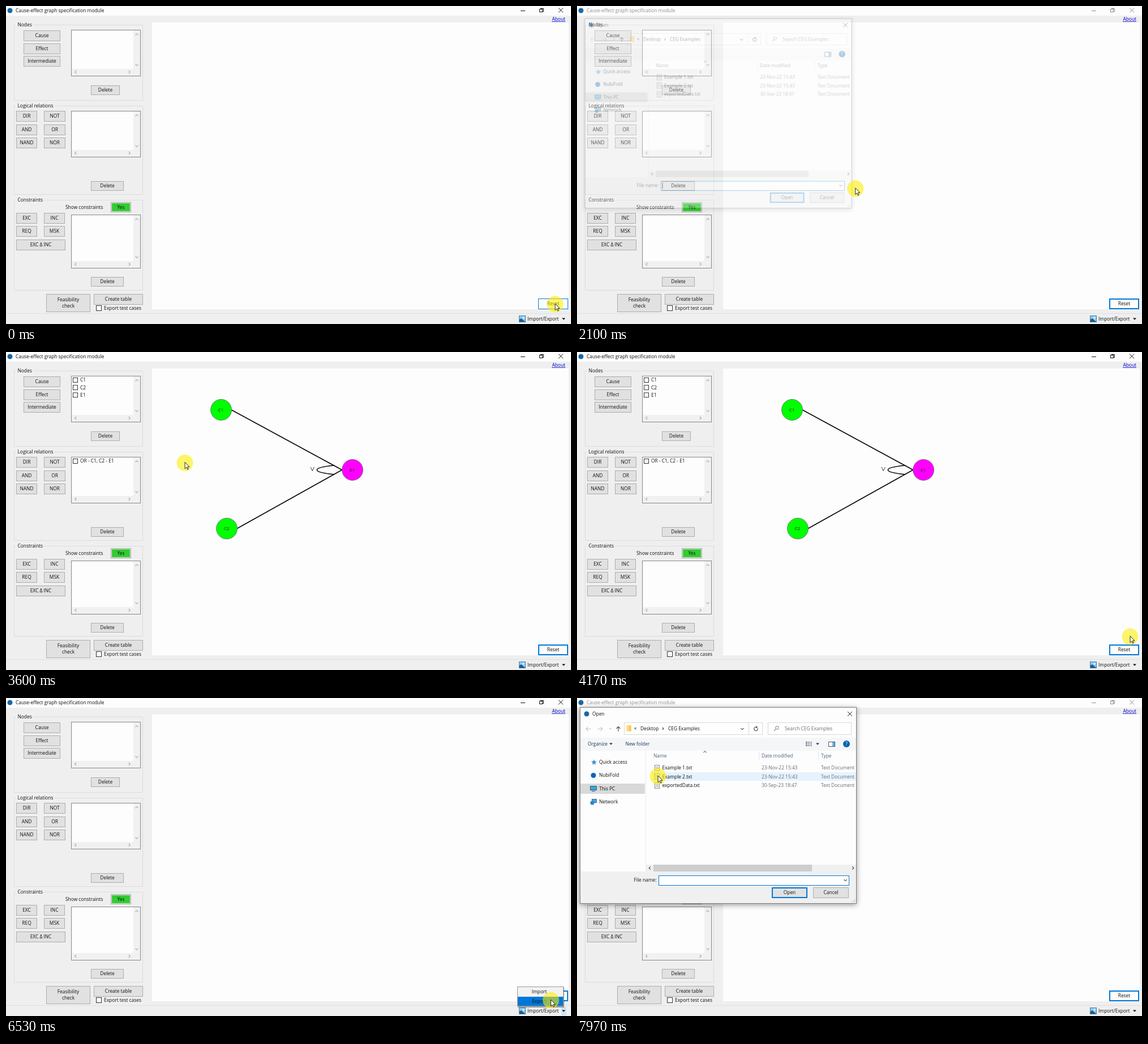
Write an HTML page with a canvas that moves like this. It is 998 px wide and 561 px high and loops after 8 s.

```html
<!DOCTYPE html>
<html lang="en">
<head>
<meta charset="utf-8">
<title>Cause-effect graph specification module</title>
<style>
html, body { margin: 0; height: 100%; overflow: hidden; background: #f0f0f0; }
canvas { display: block; width: 100vw; height: 100vh; }
</style>
</head>
<body>
<canvas id="stage" width="998" height="561"></canvas>
<script>
const LOOP = 8000, W = 998, H = 561;
const BLUE = '#0078d7', FADE_IN = 200, FADE_OUT = 160;
const screen = document.getElementById('stage').getContext('2d');
const layer = document.createElement('canvas');
layer.width = W;
layer.height = H;
const dialogCtx = layer.getContext('2d');
let c = screen;

// Pointer stops: time, x, y
const PATH = [
  [0, 970, 526], [200, 970, 526], [750, 985, 552], [930, 985, 552],
  [1300, 951, 527], [1530, 943, 517], [1670, 943, 517],
  [2450, 163, 180], [2870, 154, 171], [3120, 160, 123], [3380, 160, 123],
  [4170, 977, 502], [4480, 978, 527], [5560, 978, 527],
  [5930, 985, 552], [6180, 985, 552], [6850, 943, 517], [7000, 943, 517],
  [7400, 229, 215], [7900, 143, 138], [LOOP, 143, 138]
];
const MENUS = [[940, 1670], [6150, 7000]];
const DIALOGS = [[2040, 3360], [7320, 9000]];
const GRAPH = [3480, 4700];

const clamp = v => Math.max(0, Math.min(1, v));
const within = (t, [a, b]) => t >= a && t < b;
const inBox = (p, x, y, w, h) => p.x >= x && p.x < x + w && p.y >= y && p.y < y + h;

function pointerAt(t) {
  const i = PATH.findIndex(k => k[0] > t);
  const [t0, x0, y0] = PATH[i - 1], [t1, x1, y1] = PATH[i];
  const u = (t - t0) / (t1 - t0), e = u * u * (3 - 2 * u);
  return { x: x0 + (x1 - x0) * e, y: y0 + (y1 - y0) * e };
}

function rect(x, y, w, h, fill, stroke, lw = 1) {
  if (fill) { c.fillStyle = fill; c.fillRect(x, y, w, h); }
  if (stroke) {
    c.strokeStyle = stroke;
    c.lineWidth = lw;
    c.strokeRect(x + lw / 2, y + lw / 2, w - lw, h - lw);
  }
}

// y is the middle of the capital letters
function text(s, x, y, color = '#111', align = 'left', size = 8.4) {
  c.font = size + 'px "Open Sans", "Noto Sans", sans-serif';
  c.textAlign = align;
  c.fillStyle = color;
  c.fillText(s, x, y + size * 0.357);
}

function line(points, color = '#111', lw = 1) {
  c.beginPath();
  for (let i = 0; i < points.length; i += 2) c.lineTo(points[i], points[i + 1]);
  c.strokeStyle = color;
  c.lineWidth = lw;
  c.stroke();
}

function poly(points, fill) {
  c.beginPath();
  for (let i = 0; i < points.length; i += 2) c.lineTo(points[i], points[i + 1]);
  c.fillStyle = fill;
  c.fill();
}

function disc(x, y, r, fill, stroke) {
  c.beginPath();
  c.arc(x, y, r, 0, 7);
  c.fillStyle = fill;
  c.fill();
  if (stroke) { c.strokeStyle = stroke; c.lineWidth = 0.8; c.stroke(); }
}

// dir: 0 up, 1 right, 2 down, 3 left
function chevron(x, y, dir, color = '#a8a8a8', r = 2.6) {
  c.save();
  c.translate(x, y);
  c.rotate(dir * Math.PI / 2);
  line([-r, r / 2, 0, -r / 2, r, r / 2], color, 1.1);
  c.restore();
}

const caret = (x, y, color = '#111') => poly([x - 3, y - 1.5, x + 3, y - 1.5, x, y + 1.7], color);

function button(label, x, y, w, h = 19, edge = '#adadad', lw = 1, fill = '#e1e1e1') {
  rect(x, y, w, h, fill, edge, lw);
  const rows = label.split('\n');
  rows.forEach((s, i) => text(s, x + w / 2, y + h / 2 + (i - (rows.length - 1) / 2) * 11, '#111', 'center'));
}

function group(title, y, h, gap) {
  line([17, y + .5, 14.5, y + .5, 14.5, y + h + .5, 241.5, y + h + .5, 241.5, y + .5, 20 + gap, y + .5], '#dcdcdc');
  text(title, 20.5, y);
}

function listBox(y, h, items) {
  rect(115, y, 123, h, '#fdfdfd');
  rect(225, y, 12, h, '#f1f1f1');
  rect(116, y + h - 13, 121, 12, '#f1f1f1');
  rect(115, y, 123, h, null, '#828790');
  chevron(231, y + 8, 0);
  chevron(231, y + h - 20, 2);
  chevron(123, y + h - 7.5, 3);
  chevron(218, y + h - 7.5, 1);
  items.forEach((s, i) => {
    rect(118, y + 3 + i * 13.2, 9, 9, '#fff', '#333');
    text(s, 131, y + 7.5 + i * 13.2);
  });
}

function windowTitle(active) {
  const color = active ? '#111' : '#8f8f8f';
  rect(0, 0, W, 17, '#fdfdfd');
  disc(7, 8, 4.5, '#1769a8');
  text('Cause-effect graph specification module', 17, 8.5, color);
  line([909, 8.5, 917, 8.5], color);
  rect(942, 5, 6, 6, null, color);
  line([944, 4.5, 949.5, 4.5, 949.5, 9.5, 948, 9.5], color);
  cross(980, 7.5, color);
}

function cross(x, y, color) {
  line([x - 4, y - 4, x + 4, y + 4], color);
  line([x + 4, y - 4, x - 4, y + 4], color);
}

function panel(loaded) {
  group('Nodes', 33, 133, 27);
  button('Cause', 31, 43, 65);
  button('Effect', 31, 66, 65);
  button('Intermediate', 31, 88, 65);
  listBox(42, 82, loaded ? ['C1', 'C2', 'E1'] : []);
  button('Delete', 150, 140, 51, 17);

  group('Logical relations', 176, 156, 66);
  [['DIR', 'NOT'], ['AND', 'OR'], ['NAND', 'NOR']].forEach(([a, b], i) => {
    const y = Math.round(185 + i * 23.5);
    button(a, 18, y, 37);
    button(b, 67, y, 38);
  });
  listBox(185, 82, loaded ? ['OR - C1, C2 - E1'] : []);
  button('Delete', 150, 309, 58, 17);

  group('Constraints', 342, 159, 46);
  text('Show constraints', 105, 355);
  button('Yes', 185, 346, 36, 18);
  rect(187, 348, 32, 14, '#32cd32');
  text('Yes', 203, 355, '#111', 'center');
  [['EXC', 'INC'], ['REQ', 'MSK']].forEach(([a, b], i) => {
    button(a, 18, 365 + i * 23, 37);
    button(b, 67, 365 + i * 23, 37);
  });
  button('EXC Δ INC', 18, 412, 87);
  listBox(368, 95, []);
  button('Delete', 150, 478, 58, 17);

  button('Feasibility\ncheck', 71, 508, 78, 32);
  button('Create table', 155, 508, 87);
  rect(159, 528, 10, 10, '#fff', '#333');
  text('Export test cases', 173, 533);
}

function graph() {
  line([398, 102, 593.5, 208], '#000', 1.5);
  line([408, 311.5, 593.5, 208], '#000', 1.5);
  c.beginPath();
  c.moveTo(580, 200);
  c.bezierCurveTo(539, 204, 539, 212, 580, 216);
  c.stroke();
  line([538, 203, 541, 209.5, 544.5, 203], '#222', 0.9);
  [['C1', 380, 102, '#0f0'], ['C2', 390, 311.5, '#0f0'], ['E1', 612, 208, '#f0f']].forEach(([s, x, y, color]) => {
    disc(x, y, 18.5, color, '#667');
    text(s, x - .5, y, '#222', 'center', 8);
  });
}

function footer(p, menuOpen) {
  const hover = !menuOpen && inBox(p, 940, 516, 53, 19);
  button('Reset', 940, 516, 53, 19, BLUE, hover ? 1 : 2, '#fdfdfd');
  line([0, 542.5, W, 542.5], '#dfdfe6');
  if (menuOpen) rect(981, 545, 9, 15, '#cce4f7');
  rect(906, 546, 12, 12, '#8ccaf2', '#4d7d9f');
  poly([907, 557, 907, 553, 910, 551, 917, 557], '#1b5c91');
  disc(914, 550, 1.4, '#fff');
  text('Import/Export', 921, 552);
  caret(985, 552);
}

function menu(p) {
  rect(904, 511, 82, 35, 'rgba(0,0,0,.35)');
  rect(903, 509, 82, 35, '#f2f2f2', '#999');
  if (inBox(p, 903, 509, 82, 36)) rect(904, p.y < 526 ? 510 : 527, 80, 16, BLUE);
  text('Import', 942, 518.5, '#111', 'center');
  text('Export', 942, 535, '#111', 'center');
}

function dialogHead() {
  disc(17, 28, 4.5, '#1769a8');
  text('Open', 27, 28.5);
  cross(482, 28, '#222');

  [[20, 3, '#c8c8c8'], [41, 1, '#c8c8c8'], [73, 0, '#444']].forEach(([x, dir, color]) => {
    c.save();
    c.translate(x, 54.5);
    c.rotate(dir * Math.PI / 2);
    line([0, 4.5, 0, -4], color, 1.1);
    line([-3.5, -.5, 0, -4, 3.5, -.5], color, 1.1);
    c.restore();
  });
  chevron(59, 54, 2, '#c8c8c8', 2);
  rect(83, 43, 245, 22, '#fff', '#d9d9d9');
  line([303.5, 43, 303.5, 65], '#d9d9d9');
  rect(87, 48, 9, 11, '#f7cf62');
  rect(87, 48, 4, 11, '#ffe08a');
  text('«', 101, 53.5);
  text('Desktop', 112, 54);
  chevron(152, 54, 1, '#444', 2);
  text('CEG Examples', 161, 54);
  chevron(292, 54.5, 2, '#444');
  c.beginPath();
  c.arc(316, 54.5, 3.2, -.4, 4.9);
  c.strokeStyle = '#444';
  c.lineWidth = 1.1;
  c.stroke();
  poly([316.3, 49.3, 319.3, 51.5, 316.3, 53.5], '#444');
  rect(337, 43, 148, 22, '#fff', '#d9d9d9');
  disc(353.5, 52.5, 2.8, '#fff', '#555');
  line([351.5, 54.5, 348, 58], '#555');
  text('Search CEG Examples', 367, 54, '#6d6d6d');
}

// The command labels arrive once the window has settled
function dialogToolbar(ready) {
  rect(6, 70, 487, 23, '#f5f6f7');
  if (ready) {
    text('Organize', 19, 81, '#1e395b');
    caret(60, 81, '#1e395b');
    text('New folder', 85.5, 81, '#1e395b');
    for (let i = 0; i < 3; i++) {
      rect(404, 77 + i * 3, 3, 2, '#5f7f9f');
      rect(408, 77 + i * 3, 3, 2, '#999');
      rect(412, 77 + i * 3, 3, 2, '#999');
    }
    caret(425, 81, '#1e395b');
  }
  rect(444, 77, 12, 9, '#fff', '#456');
  rect(451, 78, 4, 7, '#69b1e4');
  disc(476, 81, 6, '#0063b1');
  text('?', 476, 81, '#fff', 'center', 9);
}

function dialogSide() {
  rect(6, 151, 114, 18, '#d9d9d9');
  line([121.5, 93, 121.5, 306], '#ececec');
  ['Quick access', 'NubiFold', 'This PC', 'Network'].forEach((s, i) => text(s, 39, 113 + i * 23.4));
  const star = [];
  for (let i = 0; i < 10; i++) {
    const a = i * Math.PI / 5 - Math.PI / 2, r = i % 2 ? 2.2 : 5.3;
    star.push(30 + r * Math.cos(a), 113.5 + r * Math.sin(a));
  }
  poly(star, '#2f8fd8');
  disc(29, 136.5, 4.5, '#0a64c0');
  rect(23, 155, 12, 8, '#35a5e5', '#3a5d75');
  line([26, 164.5, 32, 164.5], '#3a5d75');
  rect(26, 178, 9, 7, '#4aa5dd', '#356f98');
  disc(27, 185, 3.6, '#2986c4');
}

function dialogFiles(p) {
  const head = '#4c607a', dim = '#6d6d6d';
  text('Name', 135, 102, head);
  text('Date modified', 326, 102, head);
  text('Type', 431, 102, head);
  line([321.5, 94, 321.5, 110], '#e5e5e5');
  line([426.5, 94, 426.5, 110], '#e5e5e5');
  chevron(226, 95, 0, '#666');
  [['Example 1.txt', '23-Nov-22 15:43'], ['Example 2.txt', '23-Nov-22 15:43'], ['exportedData.txt', '30-Sep-23 18:47']]
    .forEach(([name, date], i) => {
      const y = 123.5 + i * 15.3, top = Math.round(y - 7.5);
      if (inBox(p, 133, top, 360, 15)) rect(133, top, 360, 15, '#e5f3ff');
      rect(137, top + 2, 9, 11, '#fafafa', '#8c8c8c');
      for (let k = 0; k < 3; k++) rect(139, top + 5 + k * 2, 5, 1, '#aaa');
      text(name, 150.5, y);
      text(date, 326, y, dim);
      text('Text Document', 431, y, dim);
    });
  rect(122, 294, 371, 12, '#f0f0f0');
  rect(135, 294, 280, 12, '#cdcdcd');
  chevron(128.5, 300, 3, '#444');
  chevron(487.5, 300, 1, '#444');
}

function dialog(p, age) {
  c.clearRect(0, 0, W, H);
  c.shadowColor = 'rgba(0,0,0,.4)';
  c.shadowBlur = 9;
  c.shadowOffsetY = 2;
  rect(5, 16, 489, 347, '#fdfdfd');
  c.shadowColor = 'transparent';
  dialogHead();
  dialogToolbar(age > FADE_IN);
  dialogSide();
  dialogFiles(p);
  rect(6, 306, 487, 56, '#f0f0f0');
  text('File name:', 140.5, 321.5, '#111', 'right');
  rect(144, 313, 337, 18, '#fff', BLUE);
  if (age % 1060 < 530) line([147.5, 316, 147.5, 327], '#111');
  chevron(474, 321.5, 2, '#444');
  button('Open', 344, 334, 63, 19, BLUE, 2);
  button('Cancel', 417, 334, 63, 19);
  for (let i = 0; i < 3; i++) for (let k = 0; k <= i; k++) rect(490 - k * 2, 355 + i * 2, 1, 1, '#aaa');
  rect(5, 16, 489, 347, null, '#7a7a7a');
}

function showDialog(p, t, [open, close]) {
  const shown = clamp((t - open) / FADE_IN) * (1 - clamp((t - close) / FADE_OUT));
  c = dialogCtx;
  dialog(p, t - open);
  c = screen;
  const s = 0.95 + 0.05 * shown;
  c.save();
  c.globalAlpha = shown;
  c.translate(249.5, 189.5);
  c.scale(s, s);
  c.drawImage(layer, -249.5, -189.5);
  c.restore();
}

function pointer({ x, y }) {
  disc(x, y, 14.5, 'rgba(255,238,0,.58)');
  const shape = [0, 0, 0, 11.5, 2.7, 9, 4.6, 13, 6.3, 12.2, 4.5, 8.3, 8, 8.3, 0, 0]
    .map((v, i) => v + (i % 2 ? y - 1 : x));
  poly(shape, '#fff');
  line(shape, '#111', 0.9);
}

function draw(t) {
  const p = pointerAt(t);
  const menuOpen = MENUS.some(m => within(t, m));
  const box = DIALOGS.find(([a, b]) => t >= a && t < b + FADE_OUT);
  const loaded = within(t, GRAPH);
  rect(0, 0, W, H, '#efefef');
  windowTitle(!box || t >= box[1]);
  text('About', 988, 23, '#0000d0', 'right');
  line([964, 27.5, 988, 27.5], '#0000d0', 0.8);
  rect(258, 29, 736, 506, '#fdfdfd');
  panel(loaded);
  if (loaded) graph();
  footer(p, menuOpen);
  if (menuOpen) menu(p);
  if (box) showDialog(p, t, box);
  pointer(p);
}

const start = performance.now();
function tick() {
  draw((performance.now() - start) % LOOP);
  requestAnimationFrame(tick);
}
tick();
</script>
</body>
</html>
```
